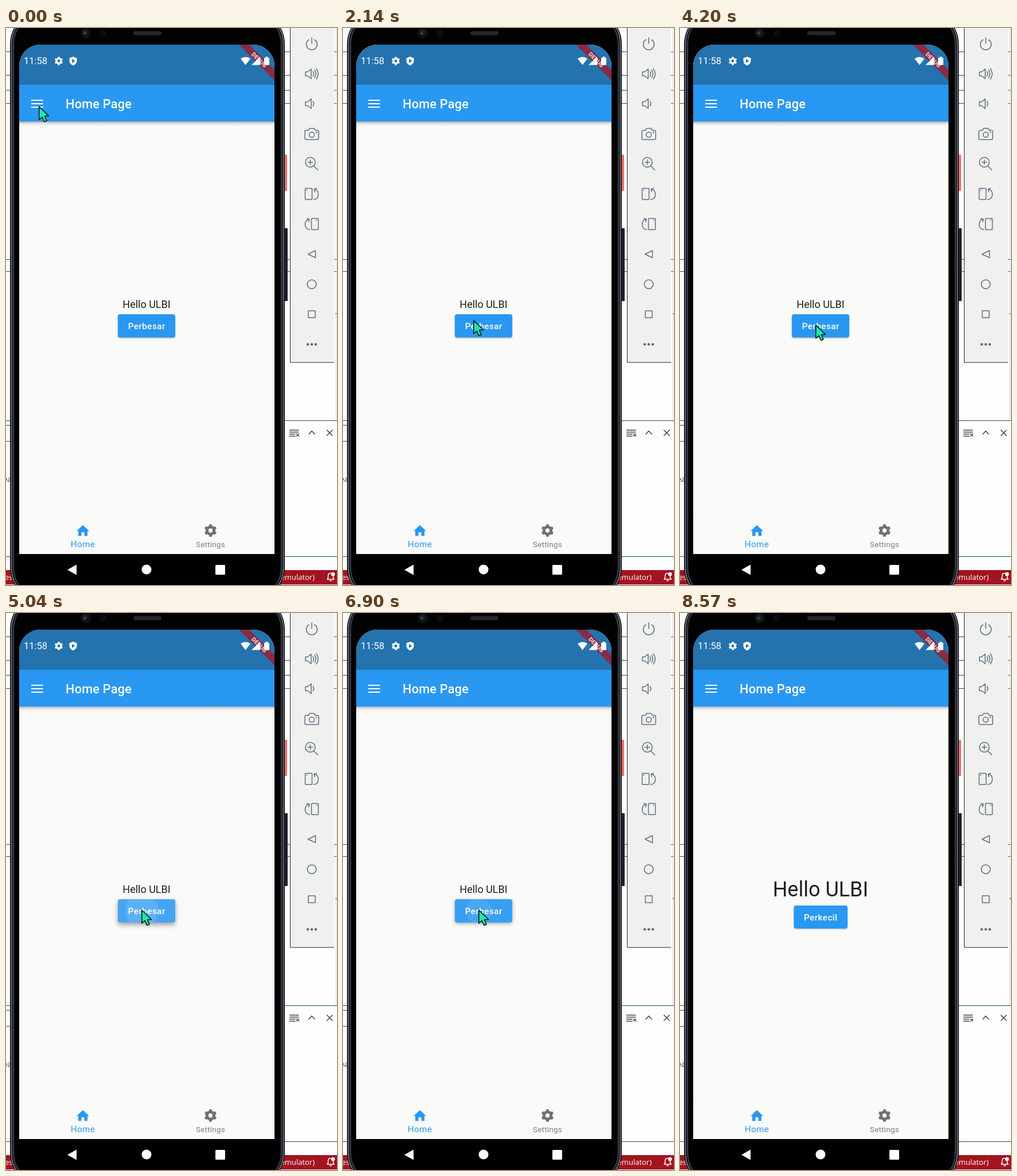
An HTML page for the animation above (8.6 s loop, 577 by 971 pixels).

```html
<!DOCTYPE html>
<html lang="id">
<head>
<meta charset="utf-8">
<title>Home Page</title>
<style>
  html, body { margin: 0; width: 100%; height: 100%; overflow: hidden; background: #fefefe; }
  svg { display: block; width: 100vw; height: 100vh; }
  text { font-family: Roboto, "Noto Sans", sans-serif; white-space: pre; }
  .ide { font-family: "Open Sans", "Noto Sans", sans-serif; font-size: 13px; }
  .line { fill: none; stroke-width: 1.5; stroke-linecap: round; stroke-linejoin: round; }
  .medium { font-weight: 500; }
</style>
</head>
<body>
<svg viewBox="0 0 577 971" preserveAspectRatio="none">
  <defs>
    <clipPath id="screen"><path d="M23 971V66A37 37 0 0 1 60 29H431A37 37 0 0 1 468 66V971Z"/></clipPath>
    <clipPath id="buttonClip"><rect id="clipRect" rx="4"/></clipPath>
    <linearGradient id="barShadow" x2="0" y2="1">
      <stop stop-color="#444" stop-opacity=".42"/>
      <stop offset=".4" stop-color="#444" stop-opacity=".14"/>
      <stop offset="1" stop-color="#444" stop-opacity="0"/>
    </linearGradient>
    <g id="gear">
      <circle r="5.7" fill="none" stroke="currentColor" stroke-width="4.6"/>
      <g id="teeth" fill="currentColor"></g>
    </g>
  </defs>

  <!-- editor window behind the phone -->
  <rect width="577" height="971" fill="#fefefe"/>
  <g id="rules" stroke="#24506c" stroke-width="1"></g>
  <path d="M575.5 0V684" stroke="#cfcfd2"/>
  <path d="M574 498H577" stroke="#555"/>
  <text class="ide" x="-5" y="791" fill="#333">ea</text>
  <rect y="945" width="577" height="25" fill="#a31420"/>
  <rect y="970" width="577" height="1" fill="#f3e6e8"/>
  <text class="ide" x="-2" y="962" fill="#fff">es.</text>
  <text class="ide" x="538" y="962" text-anchor="end" fill="#fff">emulator)</text>
  <g class="line" stroke="#fff" stroke-width="1.4">
    <path d="M560 961H572L570.5 958.500V955M566 950.500Q561.500 950.500 561.500 955V958.500L560 961M564.500 963.500H567.500"/>
    <circle cx="570" cy="952" r="2.600" fill="#fff"/>
  </g>
  <g class="line" stroke="#444" stroke-width="1.2">
    <path d="M494.500 701H510M494.500 704.500H510M494.500 708H504M494.500 711.500H504M506.500 707.500L510.500 711.500M510.500 707.500L506.500 711.500"/>
    <path d="M528 708L533 702.500L538 708M559.500 701L569 710.500M569 701L559.500 710.500"/>
  </g>

  <!-- emulator toolbar -->
  <rect x="495" y="-2" width="77" height="585" fill="#f0f0ef"/>
  <path d="M495.500 0V583H572" fill="none" stroke="#26262c"/>
  <g class="line" stroke="#5c707c">
    <path d="M528 20.500A9.500 9.500 0 1 0 538 20.500M533 17V27"/>
    <path id="speaker" d="M522 76.500H526L532 71.500V88.500L526 83.500H522Z"/>
    <path d="M535 76Q538 80 535 84M538 73.500Q542.500 80 538 86.500M541 71Q547.500 80 541 89"/>
    <use href="#speaker" y="52"/>
    <path d="M535 128Q538.500 132 535 136"/>
    <path d="M523 178.500H527L529.500 175H537L539.500 178.500H543Q545 178.500 545 180.500V192.500Q545 194.500 543 194.500H523Q521 194.500 521 192.500V180.500Q521 178.500 523 178.500Z"/>
    <circle cx="533" cy="186" r="4.500"/><circle cx="541" cy="182" r=".5"/>
    <circle cx="530.500" cy="234" r="8.500"/>
    <path d="M536.500 240.500L543.500 247.500M526.500 234H534.500M530.500 230V238"/>
    <g id="rotate">
      <rect x="521.500" y="279.500" width="12" height="19.500" rx="1"/>
      <path d="M536.500 299Q544.500 298 544.500 290T537.500 281M541.500 279.500L537 281L538.500 285.500M524 282.500H525"/>
    </g>
    <use href="#rotate" transform="matrix(-1 0 0 1 1066 52.500)"/>
    <path d="M539.500 388V400.500L526.500 394.250Z"/>
    <circle cx="533" cy="446.800" r="7.800"/>
    <rect x="527" y="493" width="12" height="12"/>
    <g fill="#5c707c" stroke="none">
      <circle cx="526" cy="551.500" r="2.300"/><circle cx="533" cy="551.500" r="2.300"/><circle cx="540" cy="551.500" r="2.300"/>
    </g>
  </g>

  <!-- phone body -->
  <rect x="484" y="221" width="6" height="63" rx="1" fill="#f0706a"/>
  <rect x="484" y="349" width="7" height="127" rx="1" fill="#202126"/>
  <rect x="7" y="-32" width="479" height="1033" rx="60" fill="#0b0c11"/>
  <rect x="9.500" y="-29.500" width="474" height="1028" rx="57" fill="none" stroke="#74777e" stroke-width="1.800"/>
  <rect x="13" y="-26" width="467" height="1021" rx="54" fill="none" stroke="#3c3e45" stroke-width="2"/>
  <rect x="15" y="-24" width="463" height="1017" rx="52" fill="#020203"/>
  <circle cx="139" cy="9" r="9" fill="#111217"/>
  <circle cx="138" cy="8" r="4.500" fill="#22242c"/>
  <circle cx="137" cy="9" r="1.500" fill="#55585f"/>
  <circle cx="169" cy="9" r="6" fill="#0c0d10"/>
  <rect x="222" y="5.500" width="49" height="7" rx="3.500" fill="#25272c"/>

  <!-- app -->
  <g clip-path="url(#screen)">
    <rect x="23" y="29" width="445" height="888" fill="#fafaf8"/>
    <rect x="23" y="163" width="445" height="8" fill="url(#barShadow)"/>
    <rect x="23" y="99" width="445" height="64" fill="#2998f2"/>
    <rect x="23" y="29" width="445" height="70" fill="#2473ae"/>
    <g transform="translate(441.500 55.500) rotate(45)">
      <rect x="-55" y="-6.500" width="110" height="13" fill="#862c48"/>
      <text y="3.700" text-anchor="middle" font-size="10.300" font-weight="900" fill="#e3cdd6">DEBUG</text>
    </g>
    <text x="31" y="63" font-size="16.500" fill="#fff">11:58</text>
    <use href="#gear" transform="translate(92 57.500) scale(.72)" color="#fff"/>
    <path d="M117 50L123.500 52.500V57Q123.500 62.500 117 65.500Q110.500 62.500 110.500 57V52.500Z" fill="#fff"/>
    <path d="M115 54V61L120.500 57.500Z" fill="#2473ae"/>
    <path d="M409 53.500Q417.500 47.500 426 53.500L417.500 64.500Z" fill="#fff"/>
    <path d="M428 64.500H443V50Z" fill="#fff"/>
    <path d="M450 52H452.500V50H456.500V52H459V64.500H450Z" fill="#fff"/>
    <path d="M44 126H64.500M44 132H64.500M44 138H64.500" stroke="#fff" stroke-width="2.100"/>
    <text class="medium" x="104" y="140" font-size="21.670" letter-spacing=".25" fill="#fff">Home Page</text>

    <text id="hello" x="245" text-anchor="middle" fill="#1f1f20">Hello ULBI</text>
    <rect id="button" rx="4" fill="#2998f2"/>
    <g clip-path="url(#buttonClip)" fill="#fff">
      <rect id="highlight" x="190" y="490" width="110" height="70"/>
      <circle id="ripple"/>
    </g>
    <text id="label" class="medium" x="245.250" text-anchor="middle" font-size="15.170" letter-spacing=".5" fill="#fff"></text>

    <rect x="23" y="852" width="445" height="65" fill="#fafaf9"/>
    <path d="M23 852.500H468" stroke="#f3f3f2"/>
    <path d="M123 877L134 866.500L145 877H142V885.500H136.500V879H131.500V885.500H126V877Z" fill="#2998f2"/>
    <text x="134" y="905" text-anchor="middle" font-size="15.170" letter-spacing=".4" fill="#2998f2">Home</text>
    <use href="#gear" transform="translate(356.500 876) scale(1.08)" color="#707070"/>
    <text x="356.500" y="905" text-anchor="middle" font-size="13.400" letter-spacing=".25" fill="#7c7c7c">Settings</text>
    <rect x="23" y="917" width="445" height="54" fill="#000"/>
    <path d="M123 935.500V953.500L107 944.500Z" fill="#fff"/>
    <circle cx="245" cy="944" r="8.500" fill="#fff"/>
    <rect x="365" y="936" width="17" height="17" rx="1.500" fill="#fff"/>
  </g>

  <path id="cursor" d="M.8 1V24L6 19.200L9.800 27.500L14 25.700L10.400 17.700L17.500 17.300Z" fill="#22e6a8" stroke="#06130f" stroke-width="1.500" stroke-linejoin="round"/>
</svg>
<script>
  const LOOP = 8600;
  const $ = id => document.getElementById(id);
  const clamp = v => Math.min(1, Math.max(0, v));
  const lerp = (a, b, p) => a + (b - a) * p;
  const ease = p => p * p * (3 - 2 * p);
  const set = (node, attrs) => {
    for (const key in attrs) node.setAttribute(key, attrs[key]);
  };

  $('teeth').innerHTML = [0, 60, 120, 180, 240, 300]
    .map(a => `<rect x="-2.300" y="-10" width="4.600" height="4" rx=".5" transform="rotate(${a})"/>`).join('');
  $('rules').innerHTML = [41, 82, 108, 131, 403, 424, 684, 921]
    .map(y => `<path d="M0 ${y}.5H577"/>`).join('') + '<path d="M0 692.500H9M0 720.500H9"/>';

  // time, x, y of the pointer tip
  const route = [
    [0, 57, 136], [700, 57, 136], [1900, 227, 509], [2300, 227, 509],
    [2800, 236, 517], [7800, 236, 517], [8300, 590, 690], [LOOP, 590, 690]
  ];
  // press and release times; each release toggles the text size
  const clicks = [[4930, 5080], [5650, 5800], [6850, 7000]];

  function pointerAt(t) {
    const i = Math.max(1, route.findIndex(stop => stop[0] > t));
    const [from, to] = [route[i - 1], route[i]];
    const p = ease((t - from[0]) / (to[0] - from[0]));
    return [lerp(from[1], to[1], p), lerp(from[2], to[2], p)];
  }

  function drawButton(t, big) {
    const box = big
      ? { x: 198.5, y: 510, width: 93.5, height: 40 }
      : { x: 195, y: 499, width: 100, height: 40.5 };
    set($('button'), box);
    set($('clipRect'), box);
    set($('label'), { y: box.y + 26 });
    $('label').textContent = big ? 'Perkecil' : 'Perbesar';

    const click = clicks.filter(c => c[0] <= t).pop();
    let lift = 0, radius = 0, opacity = 0;
    if (click) {
      const [down, up] = click;
      lift = clamp((t - down) / 100) * (1 - clamp((t - up) / 200));
      radius = lerp(17, 56, clamp((Math.min(t, up) - down) / 350 + Math.max(0, t - up) / 225));
      opacity = .12 * clamp((t - down) / 75) * (1 - clamp((t - up) / 375));
    }
    set($('highlight'), { opacity: .13 * lift });
    set($('ripple'), { cx: 237, cy: 519, r: radius, opacity });
    $('button').style.filter =
      `drop-shadow(0 ${lerp(1.5, 4, lift)}px ${lerp(1.3, 4.5, lift)}px rgba(45,45,50,${lerp(.4, .45, lift)}))`;
  }

  function render(t) {
    const big = clicks.filter(c => c[1] <= t).length % 2 === 1;
    set($('hello'), { y: big ? 494 : 487.5, 'font-size': big ? 36 : 18 });
    drawButton(t, big);
    set($('cursor'), { transform: `translate(${pointerAt(t)})` });
  }

  const start = performance.now();
  function tick(now) {
    render(Math.max(0, now - start) % LOOP);
    requestAnimationFrame(tick);
  }
  render(0);
  requestAnimationFrame(tick);
</script>
</body>
</html>
```
